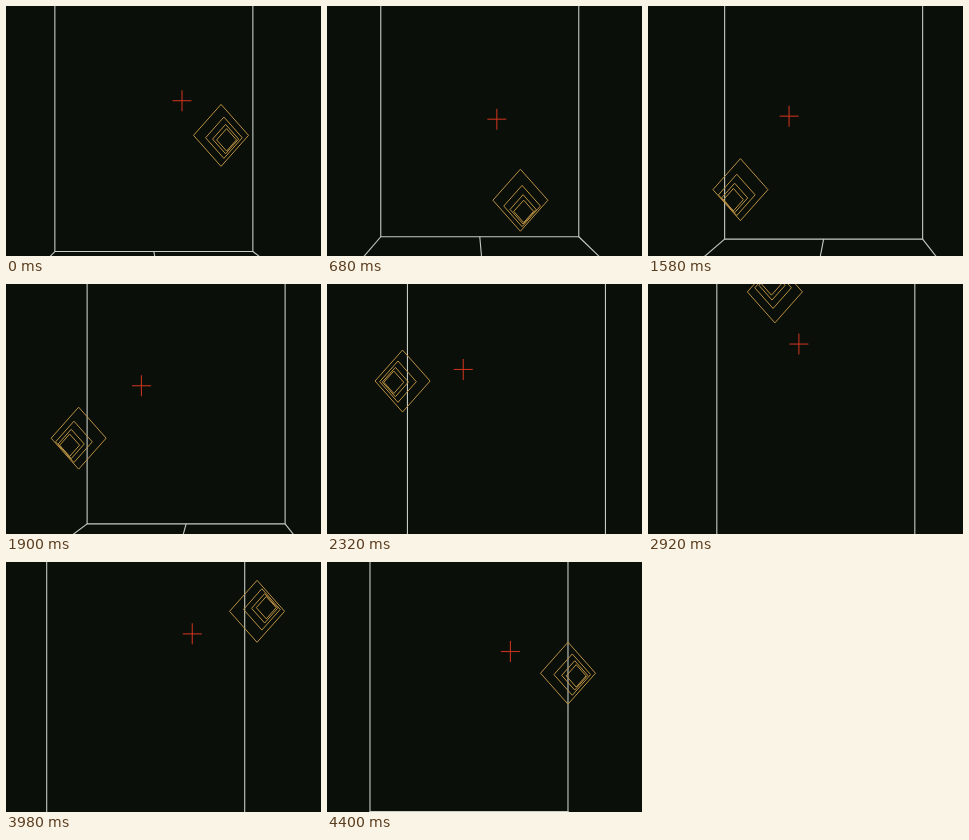
Animation of 315x250 px, one loop 4.42 s. Source, as an HTML page with a canvas:

```html
<!DOCTYPE html>
<html lang="en">
<head>
<meta charset="utf-8">
<title>Parallax room</title>
<style>
  html, body { margin: 0; width: 100%; height: 100%; overflow: hidden; background: #0a0f09; }
  canvas { display: block; width: 315px; height: 250px; }
</style>
</head>
<body>
<canvas id="stage" width="315" height="250"></canvas>
<script>
const ctx = document.getElementById('stage').getContext('2d');
const LOOP = 4420;
const BACK = '#0a0f09', WALL = '#c6ccc4', GOLD = '#b98f43', RED = '#c4321f';

// Key points of the hand-drawn circle: time in ms, x and y offset
const path = [
  [0, 54, 44], [300, 65, 94], [680, 32.5, 109], [1140, -37, 120], [1580, -68.5, 98.5],
  [1980, -91, 60], [2320, -85.5, 12], [2780, -50, -63], [3360, 21.5, -98],
  [3980, 90, -36], [4400, 80, 26]
];

function slope(i, axis) {
  const a = path[Math.max(i - 1, 0)];
  const b = path[Math.min(i + 1, path.length - 1)];
  return (b[axis] - a[axis]) / (b[0] - a[0]);
}

// Smooth curve through the key points
function offset(t, axis) {
  let i = 0;
  while (i < path.length - 2 && path[i + 1][0] <= t) i++;
  const a = path[i], b = path[i + 1];
  const span = b[0] - a[0];
  const u = Math.min(1, (t - a[0]) / span), v = 1 - u;
  return (1 + 2 * u) * v * v * a[axis] + u * v * v * span * slope(i, axis)
    + u * u * (3 - 2 * u) * b[axis] - u * u * v * span * slope(i + 1, axis);
}

function stroke(color, width, points, close) {
  ctx.strokeStyle = color;
  ctx.lineWidth = width;
  ctx.beginPath();
  for (const [x, y] of points) ctx.lineTo(x, y);
  if (close) ctx.closePath();
  ctx.stroke();
}

function drawRoom(mx, my) {
  const left = 61.1 - 0.2265 * mx, right = left + 198;
  const floor = 255.6 - 0.228 * my;
  const vx = 160 - 0.513 * mx, vy = 182 - 0.513 * my; // vanishing point
  stroke(WALL, 1.1, [[left, -10], [left, floor], [right, floor], [right, -10]]);
  const k = (260 - floor) / (floor - vy);
  if (k <= 0) return;
  for (const x of [left, (left + right) / 2, right]) {
    stroke(WALL, 1.1, [[x, floor], [x + (x - vx) * k, 260]]);
  }
}

function drawDiamonds(mx, my) {
  for (let i = 0; i < 4; i++) {
    const scale = 1 / (1 + 0.5 * i ** 1.15);
    const shift = 1 + 0.16 * (1 - scale);
    const w = 27.5 * scale, h = 31 * scale;
    const x = 161 + mx * shift, y = 85.2 + my * shift;
    stroke(GOLD, 1, [[x, y - h], [x + w, y], [x, y + h], [x - w, y]], true);
  }
}

function drawCross(mx, my) {
  const x = 160.6 + 0.285 * mx, y = 82.1 + 0.285 * my;
  stroke(RED, 1.1, [[x - 9.5, y], [x + 9.5, y]]);
  stroke(RED, 1.1, [[x, y - 10.5], [x, y + 10.5]]);
}

const start = performance.now();
function frame() {
  const t = (performance.now() - start) % LOOP;
  const mx = offset(t, 1), my = offset(t, 2);
  ctx.fillStyle = BACK;
  ctx.fillRect(0, 0, 315, 250);
  drawRoom(mx, my);
  drawDiamonds(mx, my);
  drawCross(mx, my);
  requestAnimationFrame(frame);
}
frame();
</script>
</body>
</html>
```
